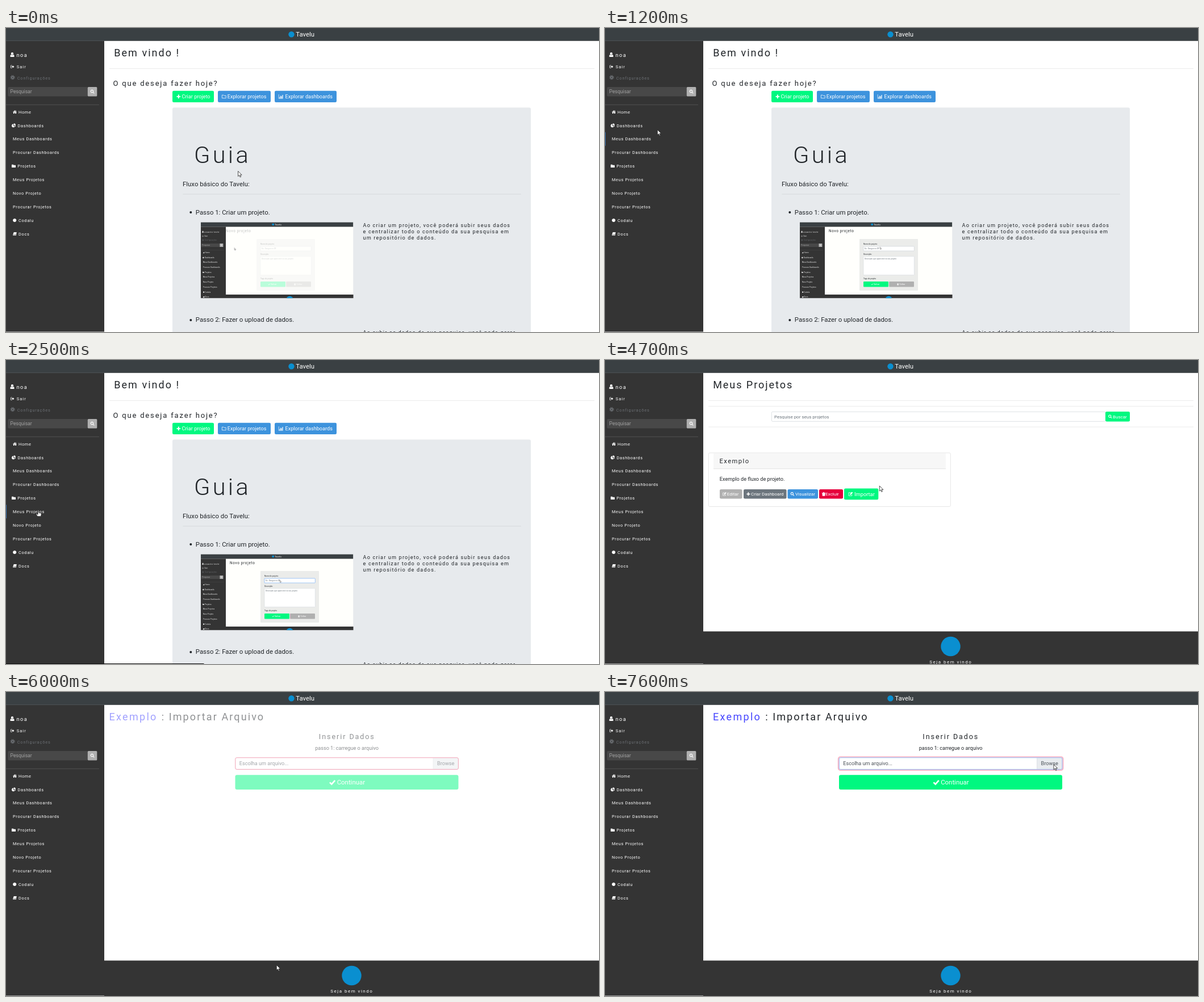
Animation of 1044 by 536 pixels, one loop 8 s. Source, as an HTML page:

```html
<!DOCTYPE html>
<html lang="pt">
<head>
<meta charset="utf-8">
<title>Projetos</title>
<style>
html, body { margin: 0; width: 100%; height: 100%; overflow: hidden; background: #fff; }
svg { display: block; width: 100vw; height: 100vh; font-family: Roboto, Arial, sans-serif; }
text { white-space: pre; }
</style>
</head>
<body>
<svg id="stage" viewBox="0 0 1044 536"></svg>
<script>
const GREEN = '#00f880', BLUE = '#3d93dd', GRAY = '#b0b0b0', DARK = '#343434', INK = '#212529';
const BRAND = 'Tavelu', LOGO = '#0a8fd0';
const BODY = 9.12, LEAD = 11.4;

const rect = (x, y, w, h, fill, r = 0, extra = '') =>
  `<rect x="${x}" y="${y}" width="${w}" height="${h}" rx="${r}" fill="${fill}" ${extra}/>`;
const frame = (x, y, w, h, fill, stroke, r = 2, sw = .7) =>
  rect(x, y, w, h, fill, r, `stroke="${stroke}" stroke-width="${sw}"`);
const text = (x, y, s, size = BODY, fill = INK, ls = 0, extra = '') =>
  `<text x="${x}" y="${y}" font-size="${size}" fill="${fill}" letter-spacing="${ls}" ${extra}>${s}</text>`;
const dot = (x, y, r, fill) => `<circle cx="${x}" cy="${y}" r="${r}" fill="${fill}"/>`;
const line = (x1, x2, y, c = '#e6e6e6') => rect(x1, y - .4, x2 - x1, .8, c);
const group = (s, attrs = '') => `<g ${attrs}>${s}</g>`;

// Icons live in an 8 x 8 box
const solid = d => `<path d="${d}" fill="currentColor"/>`;
const outline = (d, w = 1) => `<path d="${d}" fill="none" stroke="currentColor" stroke-width="${w}"/>`;
const icons = {
  plus: outline('M4 .5V7.5M.5 4H7.5', 2),
  folder: solid('M0 1.6Q0 1 .6 1H3L4 2H7.4Q8 2 8 2.6V6.4Q8 7 7.4 7H.6Q0 7 0 6.4Z'),
  folderOpen: outline('M.4 1.2H3L4 2.3H7.6V6.9H.4Z', .8),
  bars: outline('M.2 0V7.6H8', .7) + outline('M2 7V4.5M3.8 7V2.5M5.6 7V3.5M7.3 7V1', 1.2),
  user: solid('M4 0A2.2 2.2 0 0 1 4 4.4A2.2 2.2 0 0 1 4 0M1.6 4Q4 6 6.4 4Q7.6 4.8 7.6 7Q7.6 8 6.6 8H1.4Q.4 8 .4 7Q.4 4.8 1.6 4Z'),
  exit: outline('M3 1H1.6Q.6 1 .6 2V6Q.6 7 1.6 7H3', 1) + solid('M2.4 3H4.6V1.2L8 4L4.6 6.8V5H2.4Z'),
  gear: outline('M4 2.1A1.9 1.9 0 1 1 3.99 2.1', 1.9) +
    '<circle cx="4" cy="4" r="3.4" fill="none" stroke="currentColor" stroke-width="1.2" stroke-dasharray="1.5 1.17"/>',
  search: outline('M3.3 .8A2.5 2.5 0 1 1 3.29 .8M5 5L7.5 7.5', 1.3),
  home: solid('M4 .6L8 4.2L7.5 4.8L4 1.7L.5 4.8L0 4.2ZM4 2.3L6.9 4.8V7.4H4.8V5.2H3.2V7.4H1.1V4.8ZM6 1H7V2.6L6 1.8Z'),
  pie: solid('M3.6 .9V4.3L6.1 6.7A3.5 3.5 0 1 1 3.6 .9M4.4 0A3.6 3.6 0 0 1 8 3.6H4.4ZM4.8 4.4H8A3.4 3.4 0 0 1 7 6.6Z'),
  mark: solid('M4 .5A3.5 3.5 0 1 1 3.99 .5Z'),
  book: solid('M2 .8H7.8L6.2 6H.8L.5 6.6H6.6L8 2V2.5L6.8 7.3H.6Q-.3 6.8 .2 5.8Z'),
  edit: outline('M5.4 1.4H.6V7.2H6.4V4.8', .8) + solid('M2.8 5.4V3.9L6.6 .2L8 1.6L4.3 5.4Z'),
  trash: solid('M0 1.2H2.4L3 .2H5L5.6 1.2H8V2.1H0ZM.9 2.6H7.1L6.7 8H1.3Z'),
  check: outline('M.7 4.2L3.1 6.5L7.4 1.6', 1.9)
};
const icon = (name, x, y, size, color = '#fff') =>
  group(icons[name], `transform="translate(${x} ${y}) scale(${size / 8})" color="${color}"`);

function button(x, y, w, h, fill, name, ix, label, tx, size, base) {
  const s = size * .84;
  return rect(x, y, w, h, fill, 2.3) + icon(name, ix, y + h / 2 - s / 2, s) + text(tx, base, label, size, '#fff');
}

const MENU = [['Home', 22, 'home', 12], ['Dashboards', 20.5, 'pie', 10], ['Meus Dashboards', 12],
  ['Procurar Dashboards', 12], ['Projetos', 20.2, 'folder', 10], ['Meus Projetos', 12], ['Novo Projeto', 12],
  ['Procurar Projetos', 12], ['Codalu', 22, 'mark', 11.7], ['Docs', 22, 'book', 12]];
const STEP = 23.87;

function sidebar(w, user, height = 513) {
  let s = rect(0, 22.5, w, height, DARK);
  s += icon('user', 7, 43, 8) + text(18.5, 51, user, 9.2, '#fff', 1.5);
  s += icon('exit', 8, 65, 6.5) + text(18.7, 70.8, 'Sair', 7.4, '#fff', 1.1);
  s += icon('gear', 7.7, 83.2, 8, '#6a6e72') + text(19.7, 90.5, 'Configurações', 7.4, '#6a6e72', .85);
  s += rect(3.3, 104, w - 32, 16.5, '#484848', 2) + text(7.6, 115, 'Pesquisar', 8.6, '#a2a2a2');
  s += rect(w - 29.2, 104, 16.5, 16.5, GRAY, 1.5) + icon('search', w - 24.5, 108.6, 7.2);
  s += line(0, w - 9, 135.3, '#575757');
  MENU.forEach(([label, x, name, ix], i) => {
    const y = 148 + i * STEP;
    if (name) s += icon(name, ix, y - 3.5, 7);
    s += text(x, y + 2.7, label, 7.4, '#fff', .66);
  });
  return s;
}
const topBar = (w, cx) => rect(0, 0, w, 22.8, '#3a4043') +
  dot(cx - 19.5, 11.3, 5.2, LOGO) + text(cx - 11.7, 15.4, BRAND, LEAD, '#fff');

const ARROW = '<path d="M.3 .4V9.6L2.4 7.6L3.9 11L5.4 10.3L3.9 7.1H6.9Z" fill="#fff" stroke="#222" stroke-width=".8"/>';
const HAND = '<path d="M-.9 .9Q0 -.4 .9 .9V3.6L4.4 4.3Q5.3 4.6 5.2 5.6L4.5 9.7H-1.3L-3.9 6.2Q-3.8 5 -2.6 5.4L-.9 6.6Z" fill="#fff" stroke="#222" stroke-width=".7"/>';

function thumb() {
  const form = rect(448, 372, 103, 91, '#ebecea', 1) +
    text(394, 360.4, 'Novo projeto', 6.3, INK, .72) +
    text(455, 381.8, 'Nome do projeto:', 3.2) +
    `<rect id="field" x="455" y="385" width="89.3" height="8" rx=".8" fill="#fff" stroke-width=".7"/>` +
    text(457, 390.2, 'Ex.: Dengue no DF', 3.2, '#6c757d') +
    text(455, 399.6, 'Descrição:', 3.2) + frame(455, 402.7, 89.3, 32.8, '#fff', '#ced4da', .8, .5) +
    text(457, 407.8, 'Descrição que aparecerá no seu projeto', 3.2, '#6c757d') +
    text(455, 442.6, 'Tags do projeto', 3.2) +
    rect(455, 447, 44, 9.5, GREEN, 1) + icon('check', 468.5, 450.1, 3.5) + text(473, 453.1, 'Salvar', 3.8, '#fff') +
    rect(500, 447, 44, 9.5, GRAY, 1) + icon('trash', 514, 450.2, 3.2) + text(518.3, 453.1, 'Voltar', 3.8, '#fff');
  const s = rect(343, 342.5, 268.5, 133.7, '#fffffc') + group(form, 'id="form"') +
    group(sidebar(122, 'usuario teste') + topBar(738, 370), 'transform="translate(342.6 342.2) scale(.364)"') +
    rect(387, 470, 225, 7, DARK) + dot(499.5, 479, 6.2, LOGO) + group(ARROW, 'id="mini"');
  return `<clipPath id="crop"><rect x="343" y="342.5" width="268.5" height="133.7"/></clipPath>` +
    group(s, 'clip-path="url(#crop)"');
}

function homePage() {
  const aside = ['Ao criar um projeto, você poderá subir seus dados',
    'e centralizar todo o conteúdo da sua pesquisa em', 'um repositório de dados.'];
  return text(190.2, 49.6, 'Bem vindo !', 18, INK, 2.05) + line(182, 1036, 71.5) +
    text(188.4, 101.5, 'O que deseja fazer hoje?', 13, INK, 1.83) +
    button(293, 110.7, 73, 20.4, GREEN, 'plus', 300, 'Criar projeto', 309.6, BODY, 124) +
    button(373, 110.7, 93, 20.4, BLUE, 'folderOpen', 380, 'Explorar projetos', 389.8, BODY, 124) +
    button(473, 110.7, 109, 20.4, BLUE, 'bars', 480, 'Explorar dashboards', 491.5, BODY, 124) +
    rect(293, 140.3, 631, 420, '#e7eaed', 3) +
    text(331, 238, 'Guia', 41.5, INK, 4.3, 'font-weight="300"') +
    text(311, 279, `Fluxo básico do ${BRAND}:`, LEAD) + line(311.5, 907, 293, '#d2d5d8') +
    dot(325.3, 325, 2, INK) + text(333.8, 328.5, 'Passo 1: Criar um projeto.', LEAD) +
    dot(325.3, 515, 2, INK) + text(333.8, 518.3, 'Passo 2: Fazer o upload de dados.', LEAD) +
    aside.map((s, i) => text(628.6, 350.6 + i * 10.95, s, BODY, INK, 1.17)).join('') +
    text(628.6, 540.4, 'Ao subir os dados de sua pesquisa, você pode gerar', BODY, INK, 1.17) + thumb();
}

function projectsPage() {
  return text(190.2, 49.6, 'Meus Projetos', 18, INK, 1.95) +
    [71.5, 81.5, 118].map(y => line(182, 1036, y)).join('') +
    frame(293.3, 91.3, 588, 17, '#fff', '#ced4da') + text(298, 102.6, 'Pesquise por seus projetos', 8, '#6c757d') +
    button(881, 91, 43, 17.5, GREEN, 'search', 886, 'Buscar', 894, 8, 102.6) +
    frame(182.3, 163.8, 426, 94.6, '#fff', '#dcdcdc') + rect(191, 164.2, 409, 27.4, '#f7f7f7') +
    line(191, 600, 191.8, '#dcdcdc') + text(201.5, 182.2, 'Exemplo', 11.2, INK, 1.45) +
    text(201.8, 213.2, 'Exemplo de fluxo de projeto.') +
    button(202, 228, 39.5, 16.6, GRAY, 'edit', 207, 'Editar', 214.8, 8, 239.2) +
    button(244, 228, 75.5, 16.6, '#6c757d', 'plus', 249, 'Criar Dashboard', 257, 8, 239.2) +
    button(321.5, 228, 53.5, 16.6, BLUE, 'search', 326.5, 'Visualizar', 335, 8, 239.2) +
    button(377, 228, 42, 16.6, '#e6003c', 'trash', 381.7, 'Excluir', 388.2, 8, 239.2) +
    button(421, 226.4, 60.3, 19.8, GREEN, 'edit', 428.5, 'Importar', 439, 9.3, 239.6);
}

function importPage() {
  return text(190, 49.6, 'Exemplo', 18, '#4545ff', 2.3) +
    text(282.2, 49.6, ': Importar Arquivo', 18, INK, 2.1) +
    text(559.3, 83, 'Inserir Dados', 12.5, INK, 1.95) +
    text(552.7, 102.3, 'passo 1: carregue o arquivo') +
    '<rect id="glow" x="410.8" y="114.4" width="395.6" height="23.3" rx="3.4" fill="none" stroke="#e6003c" stroke-opacity=".3" stroke-width="2"/>' +
    rect(412, 115.6, 393, 21, '#fff', 2.4) + rect(760.5, 116, 44.3, 20.2, '#e9ecef', 2) +
    rect(760.2, 116, .6, 20.2, '#ced4da') +
    '<rect id="border" x="412.3" y="115.8" width="392.6" height="20.6" rx="2.4" fill="none" stroke-width=".9"/>' +
    text(419.3, 129.2, 'Escolha um arquivo...', BODY, '#495057') + text(767.6, 129.2, 'Browse', BODY, '#495057') +
    rect(412, 146.2, 393, 25.8, GREEN, 3) + icon('check', 577.5, 153.6, 11) +
    text(591.2, 163.3, 'Continuar', LEAD, '#fff');
}

const footer = rect(173, 478.5, 871, 70, DARK) + dot(608.5, 505, 17.2, LOGO) +
  text(571.3, 534.8, 'Seja bem vindo', 8, '#fff', 1.48);

const $ = id => document.getElementById(id);
$('stage').innerHTML = rect(0, 0, 1044, 536, '#fff') +
  group(homePage(), 'id="home"') + group(projectsPage(), 'id="projects"') + group(importPage(), 'id="import"') +
  group(footer, 'id="footer"') + sidebar(173, 'noa') + topBar(1044, 522) +
  `<rect id="hover" x="0" width="1" height="${STEP}" fill="#3a74b4"/>` +
  rect(0, 535, 348.5, 1, '#0c0c0c', 0, 'id="status"') +
  group(ARROW, 'id="arrow"') + group(HAND, 'id="hand"');

const clamp = v => v < 0 ? 0 : v > 1 ? 1 : v;
const ease = v => v * v * (3 - 2 * v);
const mix = (a, b, k) => a + (b - a) * k;
const show = (id, on) => $(id).setAttribute('display', on ? 'inline' : 'none');
const move = (id, x, y, s = 1) => $(id).setAttribute('transform', `translate(${x} ${y}) scale(${s})`);

// Cursor stops: time, x, y; glides only up to 2200 ms, jumps afterwards
const JUMPS = [[4700, 483, 221.5], [5100, 464, 234], [5600, 461.5, 234], [6000, 476, 481],
  [6500, 502, 180], [6900, 801, 111], [7600, 789.7, 127.3]];

function cursor(t) {
  const stop = JUMPS.filter(j => t >= j[0]).pop();
  if (stop) return stop.slice(1);
  const n = Math.floor(t / 100);
  if (n <= 12) {
    const k = ease(clamp((n - 3) / 9));
    return [mix(408.3, 92, k), mix(252, 179, k)];
  }
  const k = clamp((n - 12) / 10);
  return [mix(92, 57, ease(k)), mix(179, 266, ease(k)) - (k < .2 ? 4 : 0)];
}

function draw(t) {
  const n = Math.floor(t / 100);
  const [x, y] = cursor(t);
  const onHome = t < 4700, onProjects = t >= 4700 && t < 5600, onImport = t >= 6000;
  show('home', onHome);
  show('projects', onProjects);
  show('import', onImport);
  show('footer', !onHome);
  move('footer', 0, onProjects ? 0 : -5);

  const pointing = (t >= 1700 && onHome) || (t >= 5100 && t < 5600);
  show('hand', pointing);
  show('arrow', !pointing);
  move(pointing ? 'hand' : 'arrow', x, y);

  const row = Math.floor((y - 136) / STEP);
  show('hover', onHome && x < 173);
  $('hover').setAttribute('y', 136 + (row < 2 ? 2 : row) * STEP);
  show('status', (t >= 2400 && onHome) || (t >= 5100 && t < 6000));

  // Preview: the form slides in, then its first field takes focus
  const fade = clamp((n - 3) / 5);
  $('form').setAttribute('opacity', mix(.27, 1, fade));
  move('form', mix(-7, 0, ease(fade)), 0);
  const k = ease(clamp((n - 3) / 9)), back = clamp((n - 12) / 8);
  move('mini', mix(402, 484, k) - 2 * back, mix(387.5, 386, k) + 2 * back, .4);
  $('field').setAttribute('stroke', n >= 17 ? '#7db4f5' : '#ced4da');

  const arriving = t < 6500;
  $('import').setAttribute('opacity', arriving ? .5 : 1);
  move('import', arriving ? -8.5 : 0, 0);
  const focused = t >= 7600;
  show('glow', onImport && focused);
  $('border').setAttribute('stroke', focused ? '#86b4f5' : '#e0315f');
}

const start = performance.now();
function tick() {
  draw((performance.now() - start) % 8000);
  requestAnimationFrame(tick);
}
tick();
</script>
</body>
</html>
```
